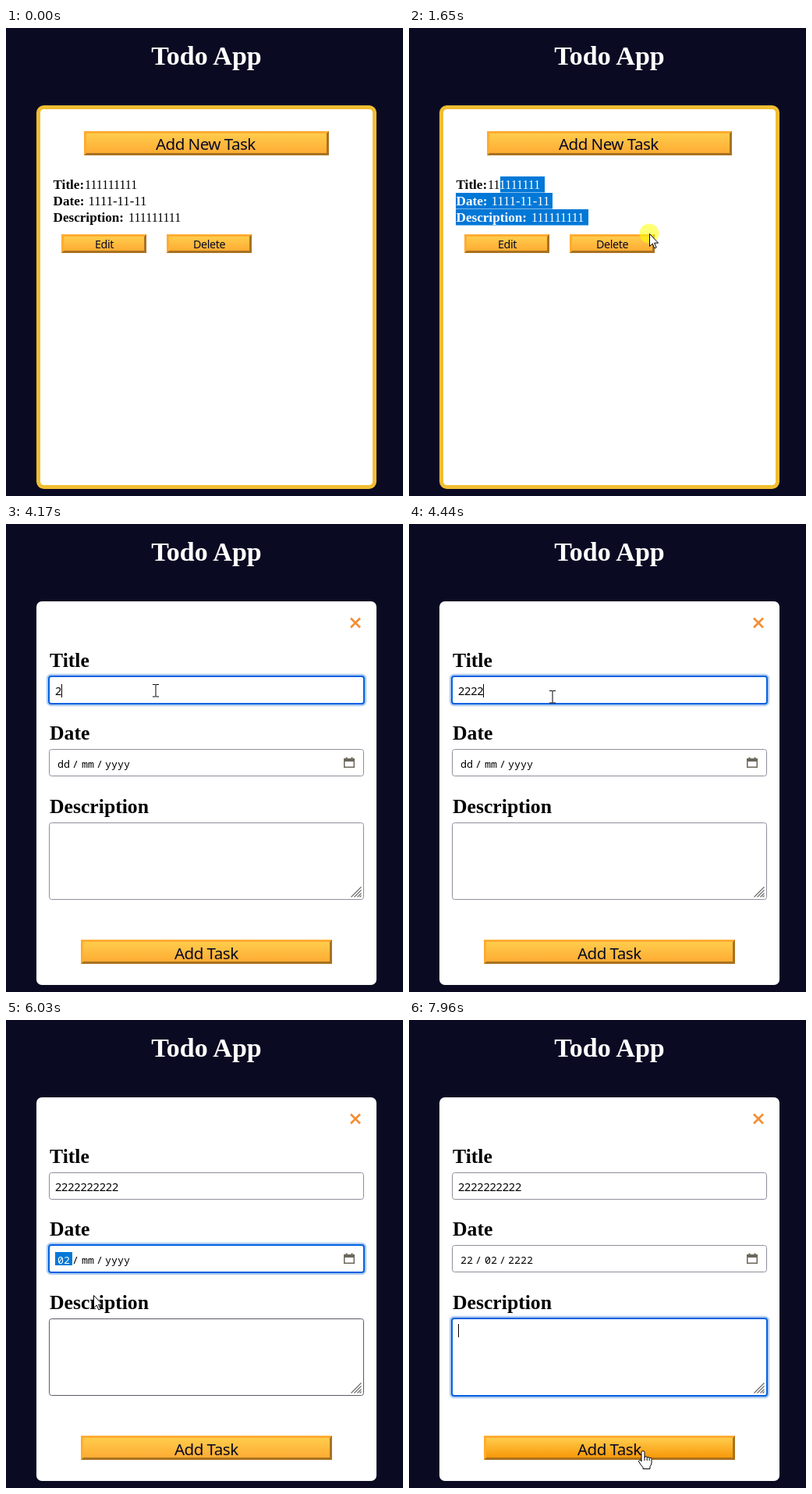
An HTML page that plays this animation: 509 by 599 pixels, repeating every 8 s.

```html
<!DOCTYPE html>
<html lang="en">
<head>
<meta charset="utf-8">
<title>Todo App</title>
<style>
  html, body { margin: 0; width: 100%; height: 100%; overflow: hidden; background: #0a0a23; }
  svg { display: block; width: 100%; height: 100%; }
  text { white-space: pre; }
  .serif { font-family: "Liberation Serif", serif; }
  .bold { font: bold 17.15px "Liberation Serif", serif; }
  .label { font: bold 25.7px "Liberation Serif", serif; }
  .btn { font-family: "Noto Sans", sans-serif; fill: #0a0a23; }
  .field { font: 14.6px "Noto Sans", sans-serif; letter-spacing: -.25px; }
  .mono { font: 13.33px "Noto Sans Mono", monospace; }
</style>
</head>
<body>
<svg id="stage" viewBox="0 0 509 599"></svg>
<script>
const LOOP = 8000;

const buttons = {
  add:    { x: 100, y: 132, w: 314, h: 31, text: 'Add New Task', tx: 192, ty: 155.5, size: 20.6 },
  edit:   { x: 71,  y: 264, w: 109, h: 24, text: 'Edit',   tx: 114, ty: 281.8, size: 14.3 },
  del:    { x: 206, y: 264, w: 109, h: 24, text: 'Delete', tx: 240, ty: 281.8, size: 14.3 },
  submit: { x: 96,  y: 532, w: 322, h: 31, text: 'Add Task', tx: 216, ty: 556.5, size: 20.6 }
};
const fields = {
  title: { y: 195, h: 35, label: 'Title', base: 183, lw: 51 },
  date:  { y: 288, h: 35, label: 'Date', base: 276, lw: 51 },
  desc:  { y: 382, h: 99, label: 'Description', base: 370, lw: 128 }
};
const rowEnds = [174, 184, 230];

// Pointer path: time, x, y
const path = [
  [240, 462, 549], [400, 322, 357], [640, 121, 196], [910, 120, 196],
  [1310, 293, 252], [1450, 294, 253], [1650, 308, 263], [2040, 308, 263],
  [2450, 284, 172], [2770, 268, 147], [3430, 268, 147], [3700, 192, 213],
  [4400, 192, 213], [4600, 120, 290], [5000, 75, 306], [5300, 75, 306],
  [5700, 112, 352], [6030, 112, 352], [6230, 158, 354], [7180, 158, 354],
  [7420, 205, 432], [7620, 205, 432], [7930, 300, 551]
];
const presses = [[910, 1980], [3240, 3380], [3840, 3980], [5170, 5300], [7490, 7610]];

const CLEAR = 1980, OPEN = 3380;
const FOCUS = { title: [3840, 5170], date: [5170, 7490], desc: [7490, LOOP] };

const within = (t, [a, b]) => t >= a && t < b;
const hit = (p, x, y, w, h) => p.x >= x && p.x < x + w && p.y >= y && p.y < y + h;
const clamp = (v, a, b) => Math.min(b, Math.max(a, v));
const $ = id => document.getElementById(id);
const show = (id, on) => $(id).setAttribute('display', on ? 'inline' : 'none');
const set = (id, attrs) => { for (const k in attrs) $(id).setAttribute(k, attrs[k]); };

function button(id) {
  const { x, y, w, h, text, tx, ty, size } = buttons[id], r = x + w, b = y + h;
  return `<rect x="${x}" y="${y}" width="${w}" height="${h}" fill="#feac32"/>
    <path d="M${r} ${y}V${b}H${x}l3-3H${r - 3}V${y + 3}z" fill="#a97221"/>
    <rect id="${id}" x="${x + 3}" y="${y + 3}" width="${w - 6}" height="${h - 6}" fill="url(#warm)"/>
    <text class="btn" x="${tx}" y="${ty}" font-size="${size}" letter-spacing="${-size * .027}">${text}</text>`;
}

function field(id) {
  const { y, h, label, base } = fields[id];
  return `<text class="label" x="56" y="${base}">${label}</text>
    <rect id="${id}Halo" x="53" y="${y - 2}" width="408" height="${h + 4}" rx="5" fill="none" stroke="#b3cdf0" stroke-width="2.5"/>
    <rect id="${id}Box" rx="3" fill="#fff"/>`;
}

function row(y, name, x, value, size) {
  return `<text class="bold" x="60.5" y="${y}">${name}</text>
    <text class="serif" x="${x}" y="${y}" font-size="${size}">${value}</text>`;
}

const gradient = (id, from, to) =>
  `<linearGradient id="${id}" x2="0" y2="1"><stop stop-color="${from}"/><stop offset="1" stop-color="${to}"/></linearGradient>`;

const part = (id, x, w) =>
  `<rect id="${id}Sel" x="${x - 3}" y="297" width="${w + 6}" height="17" fill="#0078d7"/>
   <text id="${id}" class="mono" x="${x}" y="311.5"></text>`;

$('stage').innerHTML = `
  <defs>
    ${gradient('warm', '#fecc4c', '#ffac33')}
    ${gradient('hot', '#ffcc4c', '#f89808')}
    <clipPath id="selClip"><path id="selShape"/></clipPath>
    <g id="rows">
      ${row(206, 'Title:', 101, '111111111', 16)}
      ${row(227, 'Date:', 105.5, '1111-11-11', 16.7)}
      ${row(248, 'Description:', 157, '111111111', 16)}
    </g>
  </defs>
  <rect width="509" height="599" fill="#0a0a23"/>
  <text class="serif" x="257" y="47" font-size="34" font-weight="bold" fill="#fff" text-anchor="middle">Todo App</text>
  <g id="list">
    <rect x="41.5" y="101.5" width="431" height="486" rx="7" fill="#fff" stroke="#f1be32" stroke-width="5"/>
    ${button('add')}
    <use href="#rows"/>
    <path id="sel" fill="#0078d7"/>
    <use href="#rows" fill="#fff" clip-path="url(#selClip)"/>
    ${button('edit')}${button('del')}
  </g>
  <g id="form">
    <rect x="39" y="99" width="436" height="491" rx="7" fill="#fff"/>
    <path d="M442 120.500l12 12m0-12l-12 12" stroke="#f48e35" stroke-width="2.6"/>
    ${field('title')}${field('date')}${field('desc')}
    <text id="titleText" class="field" x="63" y="219"></text>
    <rect id="caret" width="1" height="17"/>
    ${part('day', 66, 16)}${part('month', 97, 16)}${part('year', 127, 32)}
    <text class="mono" x="85" y="311.500">/</text>
    <text class="mono" x="116" y="311.500">/</text>
    <path d="M433 300h14v12h-14zM434.500 304v6.500h11V304z" fill="#6c675c" fill-rule="evenodd"/>
    <path d="M435.500 298.500h2v2h-2zm7 0h2v2h-2z" fill="#6c675c"/>
    <path d="M442.500 477.500l13-13m-9 13l9-9m-5 9l5-5m-2 5l2-2" stroke="#666" stroke-width="1.1"/>
    <g id="menu">
      <rect x="54.500" y="229.500" width="405" height="21" rx="2" fill="#2b2a33" stroke="#55545e" stroke-width=".8"/>
      <text x="61" y="244.500" fill="#fbfbfe" font-family="Noto Sans, sans-serif" font-size="10.500">2222222222</text>
    </g>
    ${button('submit')}
  </g>
  <circle id="press" r="12.500" fill="#ff0" fill-opacity=".55"/>
  <g id="pointer" stroke-linejoin="round">
    <path id="arrow" d="M.5.5V16.500l3.700-3.500 2.700 6 2.300-1-2.600-5.800h5z" fill="#fff" stroke="#000"/>
    <path id="beam" d="M-4-7.500h3.500l.5.500.5-.5H4M0-7V7.500M-4 8h3.500l.5-.5.500.5H4" fill="none" stroke="#000"/>
    <g id="hand" fill="#fff" stroke="#000">
      <path d="M-2 14V2.500a2 2 0 0 1 4 0V9a1.600 1.600 0 0 1 3.200.4 1.600 1.600 0 0 1 3 .8 1.500 1.500 0 0 1 2.800 1.300V16q0 2-2 4.500V23.500H0V21.500q-3-3-5.500-7.500a1.700 1.700 0 0 1 2.700-1.500z"/>
      <path d="M2 9v4m3.200-3.500V13m3-2.500V13" fill="none"/>
    </g>
  </g>`;

function pointerAt(t) {
  const i = path.findIndex(k => k[0] > t);
  if (i === 0) return { x: -50, y: -50 };
  if (i < 0) { const [, x, y] = path[path.length - 1]; return { x, y }; }
  const [t0, x0, y0] = path[i - 1], [t1, x1, y1] = path[i];
  const u = (t - t0) / (t1 - t0), e = u * u * (3 - 2 * u);
  return { x: x0 + (x1 - x0) * e, y: y0 + (y1 - y0) * e };
}

function selection(t, p) {
  if (!within(t, [910, CLEAR])) return '';
  const last = clamp(Math.floor((p.y - 190) / 21), 0, 2);
  let d = '';
  for (let i = 0; i <= last; i++) {
    const x = i ? 60 : 117;
    const end = i < last ? rowEnds[i] : clamp(x + 8 * Math.round((p.x - x) / 8), x, rowEnds[i]);
    d += `M${x} ${190 + 21 * i}H${end}v20.500H${x}z`;
  }
  return d;
}

function drawField(id, t, p) {
  const { y, h, base, lw } = fields[id];
  const focus = within(t, FOCUS[id]);
  const hover = hit(p, 55, y, 404, h) || hit(p, 56, base - 22, lw, 28);
  const o = focus ? 0 : .5;
  show(id + 'Halo', focus);
  set(id + 'Box', {
    x: 55 + o, y: y + o, width: 404 - 2 * o, height: h - 2 * o,
    stroke: focus ? '#0061e0' : hover ? '#5b5b66' : '#8f8f9d', 'stroke-width': focus ? 2 : 1
  });
}

function drawPart(id, text, selected) {
  $(id).textContent = text;
  set(id, { fill: selected ? '#fff' : '#000' });
  show(id + 'Sel', selected);
}

function drawDate(t) {
  drawPart('day', t < 6030 ? 'dd' : t < 6230 ? '02' : '22', within(t, [5170, 6230]));
  drawPart('month', t < 6430 ? 'mm' : '02', within(t, [6230, 6430]));
  const typed = [6630, 6880, 7050, 7250].filter(k => t >= k).length;
  drawPart('year', typed ? '2'.repeat(typed).padStart(4, '0') : 'yyyy', within(t, [6430, 7490]));
}

function update(t) {
  const p = pointerAt(t), open = t >= OPEN;
  show('list', !open);
  show('form', open);

  let onButton = false;
  for (const id in buttons) {
    const { x, y, w, h } = buttons[id];
    const hover = (id === 'submit') === open && hit(p, x, y, w, h);
    set(id, { fill: `url(#${hover ? 'hot' : 'warm'})` });
    onButton = onButton || hover;
  }

  const d = selection(t, p);
  set('sel', { d });
  set('selShape', { d });

  for (const id in fields) drawField(id, t, p);
  const n = clamp(Math.floor((t - 4150) / 90) + 1, 0, 10);
  $('titleText').textContent = '2'.repeat(n);
  const inDesc = within(t, FOCUS.desc);
  show('caret', inDesc || within(t, FOCUS.title));
  set('caret', inDesc ? { x: 63, y: 389 } : { x: 63 + Math.round(8.1 * n), y: 205 });
  show('menu', within(t, [4700, 5170]));
  drawDate(t);

  const onText = open
    ? hit(p, 55, 195, 404, 35) || hit(p, 55, 382, 404, 99)
    : rowEnds.some((end, i) => hit(p, 60, 190 + 21 * i, end - 60, 21));
  const shape = onButton ? 'hand' : onText ? 'beam' : 'arrow';
  for (const id of ['hand', 'beam', 'arrow']) show(id, id === shape);
  const at = `translate(${Math.round(p.x)} ${Math.round(p.y)})`;
  set('pointer', { transform: at });
  set('press', { transform: at });
  show('press', presses.some(r => within(t, r)));
}

const start = performance.now();
function tick() {
  update((performance.now() - start) % LOOP);
  requestAnimationFrame(tick);
}
tick();
</script>
</body>
</html>
```
